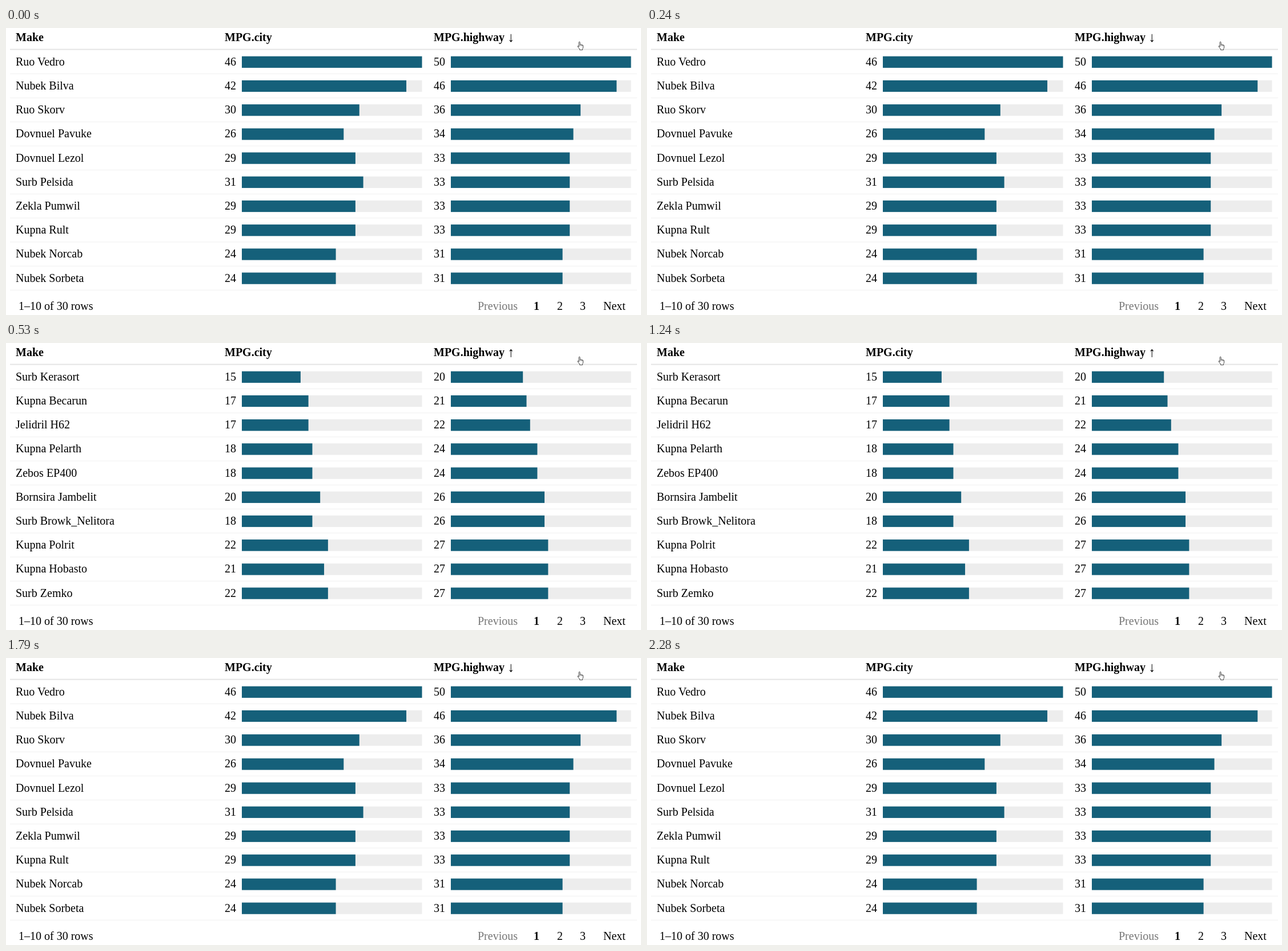
An HTML page that plays this animation: 1112x504 px, repeating every 2600 ms.

```html
<!DOCTYPE html>
<html lang="en">
<head>
<meta charset="utf-8">
<title>Sortable mileage table</title>
<style>
  html, body { margin: 0; width: 100%; height: 100%; overflow: hidden; background: #fff; }
  svg { display: block; width: 1112px; height: 504px; font: 20px "Liberation Serif", serif; }
  .bold { font-weight: bold; }
  .arrow { font-weight: bold; font-size: 24px; }
  .muted { fill: #767676; }
</style>
</head>
<body>
<svg id="stage" viewBox="0 0 1112 504"></svg>
<script>
const LOOP = 2600;
const ROW = 42.2;
const COLUMNS = [{ x: 383, max: 46 }, { x: 749, max: 50 }];
const BAR_WIDTH = 315.5;

const descending = [
  ["Ruo Vedro", 46, 50], ["Nubek Bilva", 42, 46], ["Ruo Skorv", 30, 36],
  ["Dovnuel Pavuke", 26, 34], ["Dovnuel Lezol", 29, 33], ["Surb Pelsida", 31, 33],
  ["Zekla Pumwil", 29, 33], ["Kupna Rult", 29, 33], ["Nubek Norcab", 24, 31],
  ["Nubek Sorbeta", 24, 31]
];
const ascending = [
  ["Surb Kerasort", 15, 20], ["Kupna Becarun", 17, 21], ["Jelidril H62", 17, 22],
  ["Kupna Pelarth", 18, 24], ["Zebos EP400", 18, 24], ["Bornsira Jambelit", 20, 26],
  ["Surb Browk_Nelitora", 18, 26], ["Kupna Polrit", 22, 27], ["Kupna Hobasto", 21, 27],
  ["Surb Zemko", 22, 27]
];

const stage = document.getElementById("stage");

function add(parent, tag, attrs) {
  const el = document.createElementNS("http://www.w3.org/2000/svg", tag);
  for (const key in attrs) el.setAttribute(key, attrs[key]);
  return parent.appendChild(el);
}
function text(parent, x, y, value, cls = "") {
  add(parent, "text", { x, y, class: cls }).textContent = value;
}
function rect(parent, x, y, width, height, fill) {
  return add(parent, "rect", { x, y, width, height, fill });
}
function bar(parent, x, row, share, fill) {
  rect(parent, x + 30, 49.7 + row * ROW, BAR_WIDTH * share, 20.2, fill);
}

function drawFrame() {
  text(stage, 17, 23, "Make", "bold");
  text(stage, 383, 23, "MPG.city", "bold");
  rect(stage, 7, 36.6, 1098, 2, "#e4e4e4");
  for (let i = 0; i < 10; i++) {
    rect(stage, 7, 80 + i * ROW, 1098, 1, "#f0f0f0");
    for (const { x } of COLUMNS) bar(stage, x, i, 1, "#ededed");
  }
  text(stage, 22, 495, "1–10 of 30 rows");
  text(stage, 826, 495, "Previous", "muted");
  text(stage, 924, 495, "1", "bold");
  text(stage, 965, 495, "2");
  text(stage, 1005, 495, "3");
  text(stage, 1046, 495, "Next");
}

function drawRows(rows, arrow) {
  const group = add(stage, "g", {});
  text(group, 749, 23, "MPG.highway", "bold");
  text(group, 878.5, 24, arrow, "arrow");
  rows.forEach(([name, ...values], i) => {
    const base = 65.8 + i * ROW;
    text(group, 17, base, name);
    COLUMNS.forEach(({ x, max }, c) => {
      text(group, x, base, values[c]);
      bar(group, x, i, values[c] / max, "#15607a");
    });
  });
  return group;
}

function drawPointer() {
  add(stage, "path", {
    d: "M1003.2 33V25.4q0-1.2 1-1.2t1 1.2V29q1.4-.6 2 .4 1.3-.5 1.8.5 1.6-.3 1.6 1.2V34q0 1.4-1 2.6V38.5h-5V37l-3.4-4.2q-.4-1.3.6-1.4.6 0 1.4 1.2z",
    fill: "#fff", stroke: "#333", "stroke-width": 0.9, "stroke-linejoin": "round"
  });
  add(stage, "path", { d: "M1005.2 29v2.5M1007.2 29.4v2.2M1009 29.9v2", stroke: "#333", "stroke-width": 0.7 });
}

// steps: [time in ms, visible from then on]
function toggle(el, steps) {
  const frames = steps.map(([time, on]) => ({
    offset: time / LOOP, visibility: on ? "visible" : "hidden", easing: "step-end"
  }));
  frames.push({ ...frames[frames.length - 1], offset: 1 });
  el.animate(frames, { duration: LOOP, iterations: Infinity });
}

drawFrame();
const down = drawRows(descending, "↓");
const up = drawRows(ascending, "↑");
const click = add(stage, "circle", { cx: 1004, cy: 24.5, r: 8.2, fill: "#fffb7d" });
drawPointer();

toggle(down, [[0, 1], [530, 0], [1790, 1]]);
toggle(up, [[0, 0], [530, 1], [1790, 0]]);
toggle(click, [[0, 0], [400, 1], [530, 0], [1720, 1], [1790, 0]]);
</script>
</body>
</html>
```
